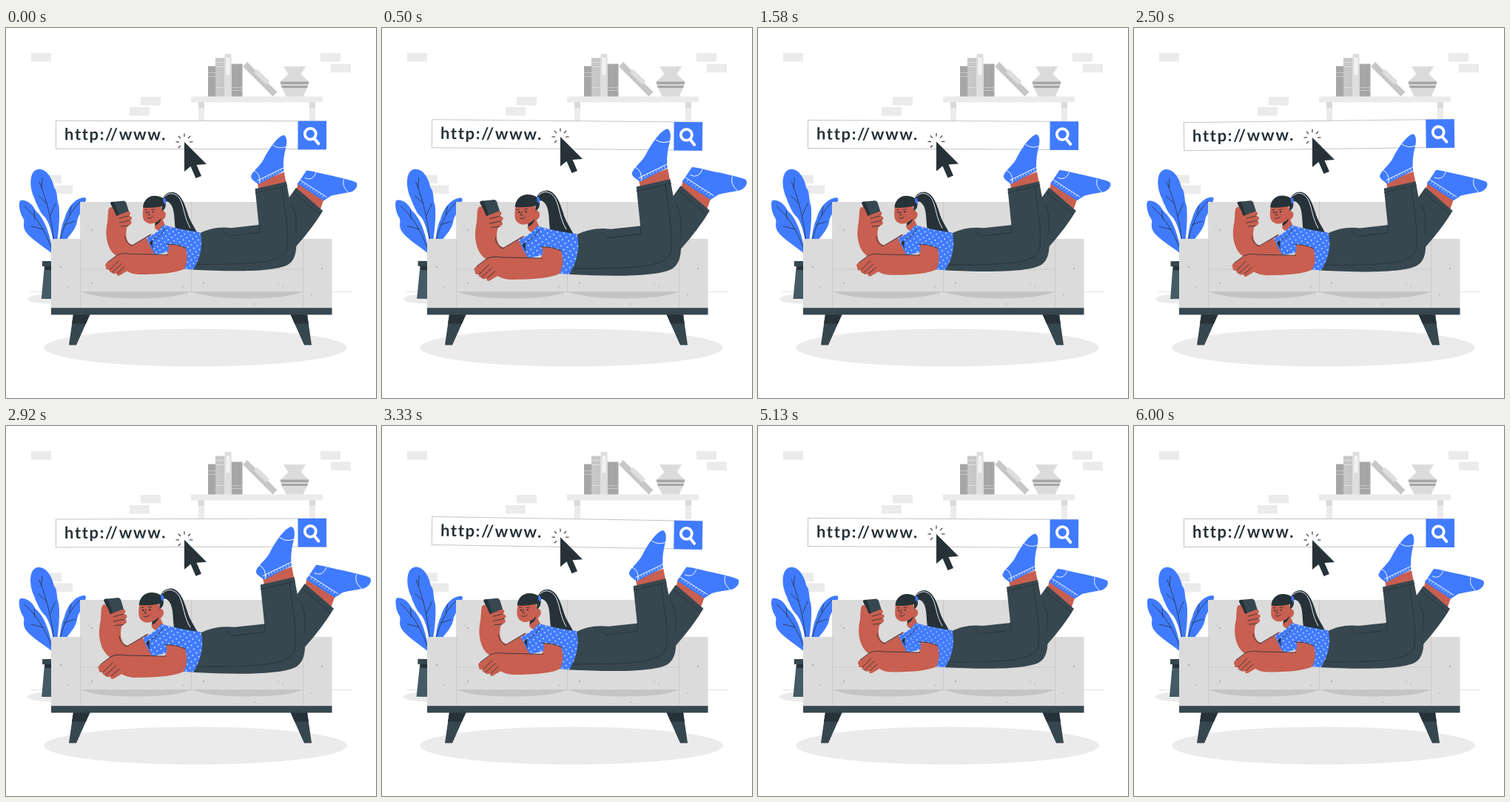
These frames come from a looping animation (500x500 px, 6040 ms). An HTML page:

```html
<!DOCTYPE html>
<html lang="en">
<head>
<meta charset="utf-8">
<title>Browsing on the sofa</title>
<style>
html, body { margin: 0; height: 100%; overflow: hidden; background: #fff; }
svg { display: block; width: 100vw; height: 100vh; }
.wall { fill: #ebebeb; }
.blue { fill: #407bff; }
.dark { fill: #263238; }
.slate { fill: #37474f; }
.skin { fill: #c85f50; }
.sofa { fill: #dbdbdb; }
.ink, .seam, .white { fill: none; stroke-linecap: round; stroke-linejoin: round; }
.ink { stroke: #263238; stroke-width: .8; }
.seam { stroke: #c4c4c4; stroke-width: .8; }
.white { stroke: #fff; stroke-width: .9; }
text { font: 700 22px Lato, "Open Sans", sans-serif; letter-spacing: 1.65px; }
</style>
</head>
<body>
<svg viewBox="0 0 500 500">
  <defs>
    <pattern id="dots" width="8" height="8" patternUnits="userSpaceOnUse" patternTransform="rotate(12)">
      <rect width="8" height="8" class="blue"/>
      <circle cx="2" cy="2" r=".8" fill="#fff"/><circle cx="6" cy="6" r=".8" fill="#fff"/>
    </pattern>
  </defs>

  <g id="bricks" class="wall"></g>
  <path d="M32 356.5H468" stroke="#d8d8d8" stroke-width=".7"/>
  <ellipse class="wall" cx="256" cy="432" rx="204.5" ry="25.5"/>
  <ellipse class="wall" cx="60" cy="366" rx="31" ry="6.5"/>

  <!-- shelf -->
  <path class="wall" d="M250 92.500H427.500V100.500H250ZM260 100H268V126H260ZM410 100H418V126H410Z"/>
  <path fill="#d9d9d9" d="M260 100.500H268V108H260ZM410 100.500H418V108H410Z"/>
  <path fill="#a6a6a6" d="M273 51.500H283.500V92.500H273ZM304.500 48.500H319.500V92.500H304.500Z"/>
  <path fill="#c7c7c7" d="M283 40.500H295.500V92.500H283ZM326 46L366.500 86.500L360.500 92.500L320 52Z"/>
  <path fill="#dedede" d="M295.500 35H304.500V92.500H295.500ZM335 60L339.500 55.500L356 72L351.500 76.500Z"/>
  <path fill="#f3f3f3" d="M297.500 40H302.500V63H297.500Z"/>
  <path stroke="#c7c7c7" d="M273 60.500H283M273 65.500H283M304.500 80.500H319.500M304.500 84.500H319.500"/>
  <path stroke="#dedede" d="M283 46.500H295M283 52.500H295M283 80.500H295"/>
  <path class="sofa" d="M375 52H405L398.500 62.500L409.500 73L408 79L401.500 92.500H378.500L372 79L370.500 73L381.500 62.500Z"/>
  <path fill="#a6a6a6" d="M370.700 72.500H409.300L408.700 76H371.300ZM372 78H408L407 81H373Z"/>

  <!-- plant -->
  <g id="plant">
    <path fill="#455a64" d="M52 321H76L80 366H48Z"/>
    <path class="dark" d="M52 321H76V327H53Z"/>
    <path class="slate" d="M49 315H80V322H49Z"/>
    <path class="blue" d="M64 306C54 297 29 283 25 272C22 264 27 262 22 255C18 248 16 234 20 233C29 232 36 239 40 247C48 254 58 268 64 306Z"/>
    <path class="blue" d="M66 308C64 282 60 266 53 256C46 250 44 243 40 235C39 230 36 227 35 221C32 210 32 193 43 191C55 189 63 205 65 216C70 221 68 231 71 239C74 254 70 288 66 308Z"/>
    <path class="blue" d="M69 308C73 288 73 270 79 258C82 246 91 230 106 229C110 230 108 234 104 241C103 250 97 252 96 262C93 277 79 284 69 308Z"/>
    <path class="ink" d="M66 308C65 270 55 232 45 208M48 216L49 203M60 253L67 237M55 237L44 227M64 305C55 276 40 254 25 241M39 258L38 247M50 272L34 268M69 308C74 275 84 250 100 235M79 266L93 261M86 252L88 241"/>
  </g>

  <!-- sofa -->
  <path class="slate" d="M91 387H113.500L95 428.500H85ZM384.500 387H407L413 428.500H403Z"/>
  <path class="dark" d="M91 387H113.500L108 399.500H89ZM384.500 387H407L408.800 399.500H390Z"/>
  <path class="sofa" d="M100 235H402V285H440.500V379H61V285H100Z"/>
  <path fill="#c4c4c4" d="M103 357H249Q226 365.500 176 365.500T103 357ZM253 357H400Q377 365.500 327 365.500T253 357Z"/>
  <path class="seam" d="M100.500 285V378M401.500 285V378M250.500 235V357M100 326H402M100 356.500H402"/>
  <path class="slate" d="M61 378.300H440.500V387.500H61Z"/>
  <g id="specks" fill="#777"></g>

  <!-- search bar -->
  <g id="bar">
    <path d="M67.500 125.500H432.500V163.500H67.500Z" fill="#fff" stroke="#c4c4c4"/>
    <path class="blue" d="M394.500 125.500H433V164H394.500Z"/>
    <circle cx="411.300" cy="142.800" r="7.500" fill="none" stroke="#fff" stroke-width="3.800"/>
    <path d="M416.800 149.300L422.300 156" stroke="#fff" stroke-width="4" stroke-linecap="round"/>
    <text class="dark" x="79" y="151.500">http://www.</text>
  </g>
  <g id="cursor">
    <g id="rays" stroke="#263238" stroke-width="1.100"></g>
    <path class="dark" d="M241 154V194L249.500 187L256.500 203L264 200L257.500 185L271 184Z"/>
  </g>

  <!-- woman -->
  <g id="woman">
    <!-- far leg -->
    <path class="skin" d="M394 208L429 230L423 247L391 222Z"/>
    <path class="slate" d="M391 216L427 247Q414 269 391 295L372 310L374 240Z"/>
    <path class="ink" d="M388 222L423 252M386 239Q394 254 390 280"/>
    <path class="blue" d="M405 193C416 194 427 198 440 200C452 203 467 206 472 209C475 214 470 220 464 222C454 224 445 225 438 227L428 233.500L393 211Z"/>
    <path class="white" d="M403 203Q413 208 418 196M455 205Q452 214 461 222M397 206L432 228.500"/>
    <g id="farRib" class="white"></g>

    <!-- near leg -->
    <path class="skin" d="M339 209L375 195L378 211L341 219Z"/>
    <path class="slate" d="M262 277C274 271 288 268 304 270L341 266L336 217.500L378 208C382 232 388 256 391 281C392 297 392 313 379 320C360 329 307 329 250 326Z"/>
    <path class="ink" d="M336.500 223L379 213M341 266L342 276L301 281Q296 278 293 274M372 215C376 246 381 270 379 295C377 317 340 319 256 319"/>
    <path class="blue" d="M374.500 145.500C378 147 379 152 378 159C376 168 373 178 374.500 194L340.500 211.500C337 208 331 206 330.500 201C332 194 342 188 347.500 178C354 165 366 147 374.500 145.500Z"/>
    <path class="white" d="M360 159Q368 165 377.500 161M334 193Q344 197 342 210M339 206.500L374 189.500"/>
    <g id="nearRib" class="white"></g>

    <!-- ponytail -->
    <path class="dark" d="M212 232C214 225 219 222 226 222C236 224 241 236 245 249C248 260 253 266 258 276L230 274C227 267 229 252 225 242C222 235 217 233 213 236Z"/>
    <path class="white" d="M215 228C221 221 231 223 236 233C241 243 241 257 249 270" stroke-width=".7"/>

    <!-- far arm and phone -->
    <path class="skin" d="M139 257C136 269 135 279 138 290C141 302 149 309 157 310L205 307L196 278L172 293C164 291 161 282 164 269L169 263L167 250L151 244Z"/>
    <path class="slate" d="M144 235L160 233.500Q162 234 163 236L167 249L150 255L142 237Q142 235 144 235Z"/>
    <path class="dark" d="M144 235L147 235L153 253L150 255L142 237Q142 235 144 235Z"/>
    <path class="skin" d="M138 260C139 251 138 243 142 242C146 242 147 248 150 254L165 248C170 248 170 252 166 254C172 254 172 259 168 260C172 262 170 266 166 267C162 272 148 272 141 270Z"/>
    <path class="ink" d="M166 254L154 257M168 260L154 263M166 267L156 268M196 279L170 294M161 281Q162 290 170 294" stroke-width=".6"/>

    <!-- head -->
    <path class="skin" d="M186.500 239C185 248 184 257 188 261C192 265 198 265 202 263L201 269Q206 278 217 270L212 259C218 256 217 247 212 247L207 235Z"/>
    <path class="dark" d="M202 263Q207 261 210 257Q209 264 201.500 267Z"/>
    <path class="dark" d="M185.500 242.500C186 233 193 227 201 227C211 227 217 232 216 239C216 243 214 246 211 247.500V241Q196 244 185.500 242.500Z"/>
    <path class="blue" d="M212.500 231L214.500 229.500Q218 233 215.500 238L213 235.500Z"/>
    <circle class="dark" cx="190.500" cy="249" r="1.100"/>
    <circle class="dark" cx="199" cy="248.500" r="1.100"/>
    <path class="ink" d="M188 246L191 245.500M197 245.500L201 245M194 248L192.500 252.500L195 253M191.500 256.500Q195 258.500 198.500 255" stroke-width=".7"/>

    <!-- shirt -->
    <path fill="url(#dots)" d="M213 266C230 271 248 274 262 276C266 287 265 307 253 326L240 325L220 302L202 306Q195 296 190 283Q203 279 213 266Z"/>
    <path class="dark" d="M194 289L199 286Q197 293 200 300Z"/>
    <path class="ink" d="M201 285Q210 281 215 271" stroke-width=".5"/>

    <!-- near arm -->
    <path class="skin" d="M219 291L242 295Q248 311 241 325Q227 332.500 180 332.500Q170 332 164 328Q159 331 154 334Q149 335 151 331Q145 333 144 330Q139 329 141 326Q135 327 136 322.500Q133 319 138 316L150 307Q157 303 169 305L217 306Q222 300 219 291Z"/>
    <path fill="url(#dots)" d="M220 273Q242 274 243 297Q231 291 217 292Z"/>
    <path class="ink" d="M217 292Q231 291 243 297M219 306L169 305Q157 303 150 307L138 316M153 314L141 326M157 318L144 330M161 322L151 331" stroke-width=".6"/>
  </g>
</svg>
<script>
const LOOP = 6040, WIND = LOOP / 4, LEAD = 40;
const $ = id => document.getElementById(id);
const move = (id, value) => $(id).setAttribute("transform", value);

// Linear interpolation through [position, value] keys
function track(keys, p) {
  const i = keys.findIndex(k => k[0] > p);
  const [a, u] = keys[i - 1], [b, v] = keys[i];
  return u + (v - u) * (p - a) / (b - a);
}

$("bricks").innerHTML = [[34, 34], [425, 34], [439, 48.5], [182, 93], [167, 107], [48, 198.5], [63, 212.5]]
  .map(([x, y]) => `<rect x="${x}" y="${y}" width="27" height="11.5"/>`).join("");

$("specks").innerHTML = [[116, 345], [111, 348], [239, 350], [267, 345], [368, 345], [374, 349],
  [427, 325], [413, 361], [336, 373], [74, 323], [84, 350], [111, 268], [116, 273]]
  .map(([x, y], i) => `<circle cx="${x}" cy="${y}" r="${i % 3 ? .55 : .8}"/>`).join("");

$("rays").innerHTML = [135, 180, 225, 270, 315, 360]
  .map(a => `<path d="M7 0H11.5" transform="translate(241 154) rotate(${a})"/>`).join("");

// Short knitted ticks along the sock opening
function rib(id, x1, y1, x2, y2, dx, dy) {
  let d = "";
  for (let i = 1; i < 10; i++) {
    const x = x1 + (x2 - x1) * i / 10, y = y1 + (y2 - y1) * i / 10;
    d += `M${x} ${y}l${dx} ${dy}`;
  }
  $(id).innerHTML = `<path d="${d}" stroke-width=".6"/>`;
}
rib("nearRib", 339, 206.5, 374, 189.5, 1, 3);
rib("farRib", 397, 206, 432, 228.5, -2, 2.5);

const beat = [[0, 1], [.1, 1.1], [.3, 1], [.4, 1], [.5, 1.1], [.6, 1], [1, 1]];
const sway = [[0, 0], [.25, 1], [.75, -1], [1, 0]];

function draw() {
  const t = performance.now() + LEAD;
  const slow = t % LOOP / LOOP, quick = t % WIND / WIND;
  const angle = track(sway, quick);
  const lift = 4.25 * (1 - Math.cos(2 * Math.PI * quick));
  move("woman", `translate(250 250) scale(${track(beat, slow)}) translate(-250 -250)`);
  move("bar", `rotate(${angle} 250 144.7)`);
  move("plant", `rotate(${angle} 64 278)`);
  move("cursor", `translate(0 ${-lift})`);
  requestAnimationFrame(draw);
}
draw();
</script>
</body>
</html>
```
